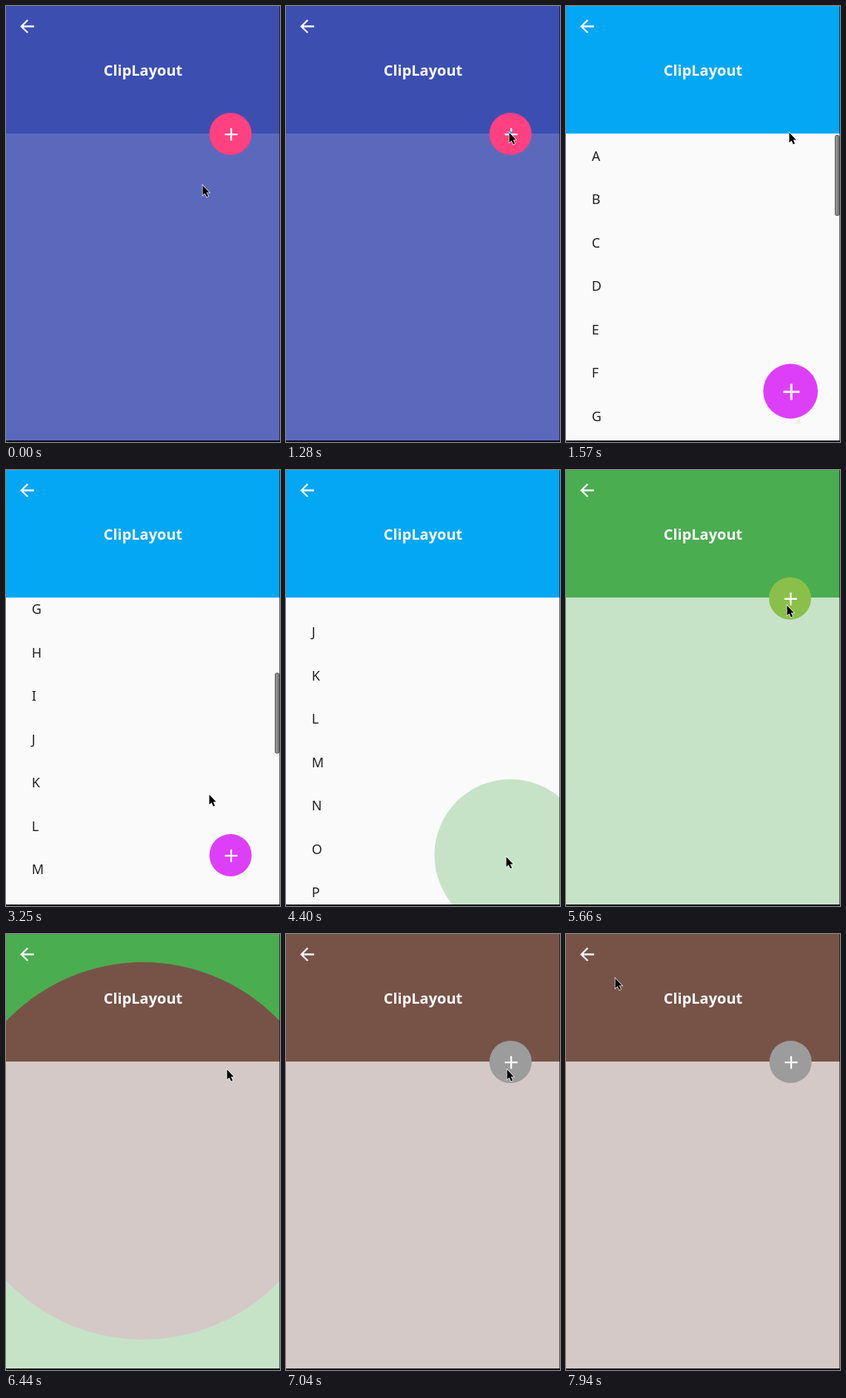
Recreate the animation shown at these times as an HTML page with a canvas. Size 370 px wide and 588 px high, loop 7.99 s.

```html
<!DOCTYPE html>
<html lang="en">
<head>
<meta charset="utf-8">
<title>ClipLayout</title>
<style>
  html, body { margin: 0; height: 100%; overflow: hidden; background: #000; }
  canvas { display: block; }
</style>
</head>
<body>
<canvas id="stage" width="370" height="588"></canvas>
<script>
const ctx = document.getElementById('stage').getContext('2d');
const LOOP = 7990, W = 370, H = 588, BAR = 172, ROW = 58.5;

// start/time: when the page is revealed, from (cx, cy); pop: when its button springs in
const pages = [
  { bar: '#3c4fb1', body: '#5b69bd', fab: '#ff4081', y: 172.5, start: -1e4, pop: -1e4 },
  { bar: '#04a7f3', body: '#fafafa', fab: '#dd3ff9', y: 519.5, list: true,
    start: 1260, time: 260, power: 2, cx: 303, cy: 172.5, r: 516, pop: 1500 },
  { bar: '#4aad50', body: '#c6e3c8', fab: '#8ac04a', y: 172.5,
    start: 4080, time: 580, power: 3, cx: 303, cy: 519.5, r: 605, pop: 4620 },
  { bar: '#775347', body: '#d4c9c6', fab: '#9c9c9c', y: 172.5,
    start: 6000, time: 515, power: 2, cx: 185, cy: 292.5, r: 347, pop: 6700 }
];

const scrollKeys = [[2090, 0], [3250, 365], [3660, 510]];
const cursorKeys = [
  [60, 265, 241], [360, 282, 205], [660, 301, 170], [1700, 301, 170],
  [2050, 285, 330], [2200, 274, 437], [3400, 274, 437], [3730, 296, 520],
  [3790, 297, 521], [4860, 297, 521], [5000, 278, 430], [5120, 271, 340],
  [5360, 298, 182], [7390, 298, 182], [7520, 329, 193], [7720, 210, 120], [7940, 66, 59]
];

const clamp = v => Math.min(1, Math.max(0, v));
const ease = p => p < .5 ? 2 * p * p : 1 - 2 * (1 - p) ** 2;

// Linear interpolation between [time, ...values] keys
function track(keys, t) {
  const i = keys.findIndex(k => k[0] > t);
  if (i === 0) return keys[0].slice(1);
  if (i < 0) return keys[keys.length - 1].slice(1);
  const a = keys[i - 1], b = keys[i], p = (t - a[0]) / (b[0] - a[0]);
  return a.slice(1).map((v, n) => v + (b[n + 1] - v) * p);
}

function rect(color, x, y, w, h) {
  ctx.fillStyle = color;
  ctx.fillRect(x, y, w, h);
}

function disc(x, y, r) {
  ctx.beginPath();
  ctx.arc(x, y, r, 0, 2 * Math.PI);
}

function spring(t) {
  return t < 0 ? 0 : 1 - Math.exp(-.0172 * t) * Math.cos(.045 * t);
}

function drawFab(page, t) {
  const move = page === pages[2] ? ease(clamp((t - 5640) / 400)) : 0;
  const scale = spring(t - page.pop);
  if (!scale) return;
  ctx.save();
  ctx.translate(303.2 - 118.2 * move, page.y + 120 * move);
  ctx.scale(scale, scale);
  ctx.fillStyle = page.fab;
  disc(0, 0, 28.5);
  ctx.fill();
  rect('#fff', -7.6, -.5, 17, 2.3);
  rect('#fff', -.3, -7.8, 2.3, 17);
  ctx.restore();
}

function drawList(t) {
  const [scroll] = track(scrollKeys, t);
  ctx.save();
  ctx.beginPath();
  ctx.rect(0, BAR, W, H - BAR);
  ctx.clip();
  ctx.fillStyle = '#222';
  ctx.font = '18px "Noto Sans", sans-serif';
  ctx.textAlign = 'left';
  for (let i = 0; i < 26; i++) {
    ctx.fillText(String.fromCharCode(65 + i), 34.8, 208.5 + i * ROW - scroll);
  }
  ctx.restore();
  if (t < 4100) {
    const shade = ctx.createLinearGradient(363, 0, 369, 0);
    shade.addColorStop(0, '#a0a0a0');
    shade.addColorStop(1, '#777');
    ctx.fillStyle = shade;
    ctx.strokeStyle = '#555';
    ctx.lineWidth = 1;
    ctx.beginPath();
    ctx.roundRect(363.5, 174.5 + scroll * .272, 5.5, 108, 2);
    ctx.fill();
    ctx.stroke();
  }
}

function drawPage(page, t) {
  if (t < page.start) return;
  const p = page.time ? clamp((t - page.start) / page.time) : 1;
  ctx.save();
  if (p < 1) {
    disc(page.cx, page.cy, page.r * p ** page.power);
    ctx.clip();
  }
  rect(page.bar, 0, 0, W, BAR);
  rect(page.body, 0, BAR, W, H - BAR);
  if (page.list) drawList(t);
  drawFab(page, t);
  ctx.restore();
}

function drawHeader() {
  ctx.save();
  ctx.translate(28.5, 27.5);
  ctx.scale(1.17, 1.17);
  ctx.translate(-12, -12);
  ctx.fillStyle = '#fff';
  ctx.fill(new Path2D('M20 11H7.83l5.59-5.59L12 4l-8 8 8 8 1.41-1.41L7.83 13H20z'));
  ctx.restore();
  ctx.fillStyle = '#fff';
  ctx.font = 'bold 20px "Noto Sans", sans-serif';
  ctx.textAlign = 'center';
  ctx.fillText('ClipLayout', 185, 94);
}

function drawCursor(t) {
  const [x, y] = track(cursorKeys, t);
  ctx.save();
  ctx.translate(Math.round(x) + .5, Math.round(y) + .8);
  const arrow = new Path2D('M0 0V13.4L3 10.6L5.4 15.7L7.6 14.7L5.3 9.8H9.2Z');
  ctx.strokeStyle = '#fff';
  ctx.lineWidth = 1.4;
  ctx.stroke(arrow);
  ctx.fillStyle = '#000';
  ctx.fill(arrow);
  ctx.restore();
}

function frame(now) {
  const t = now % LOOP;
  for (const page of pages) drawPage(page, t);
  drawHeader();
  drawCursor(t);
  rect('rgba(0,0,0,.6)', 369, 0, 1, H);
  rect('#000', 0, 586, W, 2);
  requestAnimationFrame(frame);
}
requestAnimationFrame(frame);
</script>
</body>
</html>
```
